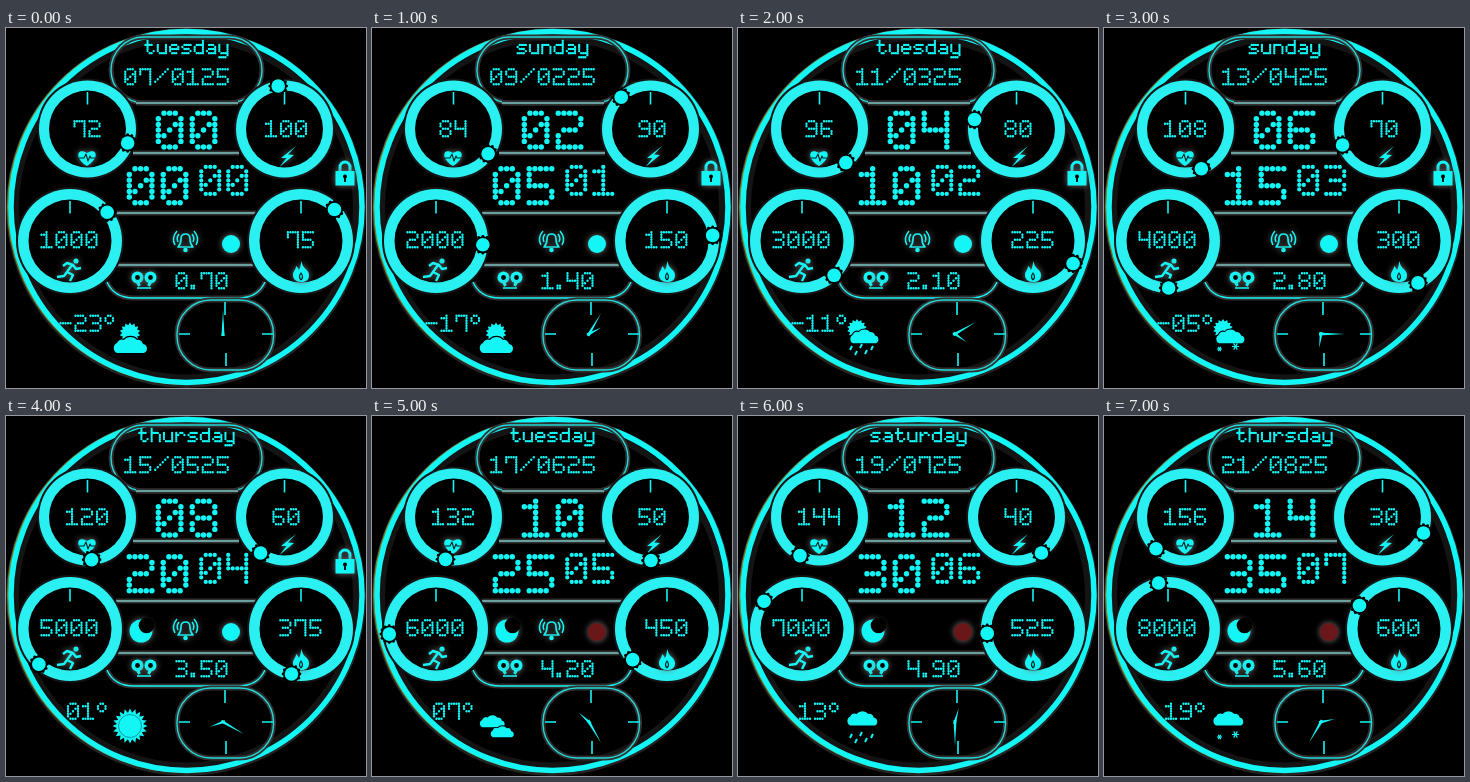
An HTML page with a canvas for the animation above (8000 ms loop, 360 by 360 pixels).

```html
<!DOCTYPE html>
<html lang="en">
<head>
<meta charset="utf-8">
<title>Watch face</title>
<style>
  html, body { margin: 0; width: 100%; height: 100%; overflow: hidden; background: #000; }
  canvas { display: block; }
</style>
</head>
<body>
<canvas id="face" width="360" height="360"></canvas>
<script>
const c = document.getElementById('face').getContext('2d');
const CYAN = '#14f5f5', RING = '#2af0f2', HALO = '#303030', TAU = Math.PI * 2;

// Each glyph is a set of strokes through column/row points of a dot grid.
const GLYPHS = {
  0: '10 30 41 45 36 16 05 01 10|32 14', 1: '01 11 20 26|06 46',
  2: '00 30 41 42 33 13 04 06 46', 3: '00 30 41 42 33 13|33 44 45 36 06',
  4: '00 03 43|40 46', 5: '40 00 03 33 44 45 36 06',
  6: '40 10 01 05 16 36 45 44 33 03', 7: '02 00 40 46',
  8: '10 30 41 42 33 13 02 01 10|33 44 45 36 16 05 04 13',
  9: '43 13 02 01 10 30 41 45 36 06',
  '-': '03 43', '/': '50 05', '.': '05 15 16 06', '°': '10 20 31 32 23 13 02 01 10',
  t: '10 15 26 36 45|02 32', u: '02 05 16 36|42 46', e: '04 44 43 32 12 03 05 16 36',
  s: '42 12 03 14 34 45 36 06', d: '40 46 16 05 03 12 42', a: '12 32 43 46 16 05 14 44',
  y: '02 05 16 46|42 47 38 08', h: '00 06|02 32 43 46', r: '02 06|04 22 32 43',
  n: '02 06|02 32 43 46'
};
const DAYS = ['tuesday', 'sunday', 'tuesday', 'sunday', 'thursday', 'tuesday', 'saturday', 'thursday'];
const ADVANCE = { '.': 4, '/': 7 };
const pad = n => String(n).padStart(2, '0');
const advance = ch => ADVANCE[ch] || 6;

function glyphDots(glyph) {
  const dots = new Set();
  for (const stroke of glyph.split('|')) {
    const points = stroke.split(' ').map(p => [+p[0], +p[1]]);
    for (let i = 1; i < points.length; i++) {
      const [x, y] = points[i - 1], dx = points[i][0] - x, dy = points[i][1] - y;
      const n = Math.max(Math.abs(dx), Math.abs(dy));
      for (let k = 0; k <= n; k++) dots.add(Math.round(x + dx * k / n) + ',' + Math.round(y + dy * k / n));
    }
  }
  return [...dots].map(d => d.split(',').map(Number));
}
const DOTS = Object.fromEntries(Object.entries(GLYPHS).map(([ch, g]) => [ch, glyphDots(g)]));

function disc(x, y, r, color = CYAN) {
  c.fillStyle = color;
  c.beginPath();
  c.arc(x, y, r, 0, TAU);
  c.fill();
}

function circle(x, y, r, width, color) {
  c.strokeStyle = color;
  c.lineWidth = width;
  c.beginPath();
  c.arc(x, y, r, 0, TAU);
  c.stroke();
}

function text(str, x, y, pitch) {
  const r = Math.max(1.18, pitch * .48);
  c.fillStyle = CYAN;
  c.beginPath();
  for (const ch of str) {
    for (const [col, row] of DOTS[ch]) {
      const px = x + (col + .5) * pitch, py = y + (row + .5) * pitch;
      c.moveTo(px + r, py);
      c.arc(px, py, r, 0, TAU);
    }
    x += advance(ch) * pitch;
  }
  c.fill();
}

function centered(str, cx, y, pitch = 2.5) {
  const columns = [...str].reduce((sum, ch) => sum + advance(ch), -1);
  text(str, cx - columns * pitch / 2, y, pitch);
}

function fill(d, color = CYAN) {
  c.fillStyle = color;
  c.fill(new Path2D(d));
}

function line(d, width, color = CYAN) {
  c.strokeStyle = color;
  c.lineWidth = width;
  c.stroke(new Path2D(d));
}

function glow(draw) {
  c.save();
  c.shadowColor = '#777';
  c.shadowBlur = 6;
  draw();
  c.restore();
}

function haloLine(d, color) {
  line(d, 5, HALO);
  line(d, 1.4, color);
}

function pill(x, y, w, h, r) {
  const side = w - 2 * r, rise = h - 2 * r, arc = `a${r} ${r} 0 0 1 `;
  haloLine(`M${x + r} ${y}h${side}${arc}${r} ${r}v${rise}${arc}${-r} ${r}h${-side}${arc}${-r} ${-r}v${-rise}${arc}${r} ${-r}Z`, '#22d8d8');
}

function ring(x, y, r, width) {
  disc(x, y, r + 2, '#151515');
  disc(x, y, r, RING);
  disc(x, y, r - width, '#000');
  line(`M${x} ${y - r + width + 1.5}v12.5`, 1.6);
}

function knob(x, y, r, degrees) {
  const a = degrees * Math.PI / 180, kx = x + r * Math.sin(a), ky = y - r * Math.cos(a);
  disc(kx, ky, 8.6, '#000');
  for (let i = 0; i < 12; i++) disc(kx + 8.4 * Math.cos(i * TAU / 12), ky + 8.4 * Math.sin(i * TAU / 12), 1.4, '#000');
  disc(kx, ky, 6.8);
}

function hand(degrees, length) {
  c.save();
  c.translate(217, 306);
  c.rotate(degrees * Math.PI / 180);
  fill(`M-1.5 2L0 ${-length}L1.5 2Z`);
  c.restore();
}

function sun(x, y, r, rays) {
  c.fillStyle = CYAN;
  c.beginPath();
  for (let i = 0; i < rays * 2; i++) {
    const a = i * Math.PI / rays, d = i % 2 ? r * .76 : r;
    c.lineTo(x + d * Math.sin(a), y - d * Math.cos(a));
  }
  c.fill();
}

function cloud(x, y, s = 1) {
  c.save();
  c.translate(x, y);
  c.scale(s, s);
  const d = 'M-13 9A5.5 5.5 0 0 1-13-1A5 5 0 0 1-6-4A8 7 0 0 1 7-4A5 5 0 0 1 13 0A4.7 4.7 0 0 1 14 9Z';
  line(d, 2.5, '#000');
  fill(d);
  c.restore();
}

function rain() {
  for (const [x, y] of [[114, 318], [124, 316], [135, 318], [119, 323], [129, 322]])
    line(`M${x} ${y}l-2 4`, 2);
}

function flake(x, y, r) {
  for (let i = 0; i < 3; i++) {
    const dx = r * Math.cos(i * Math.PI / 3), dy = r * Math.sin(i * Math.PI / 3);
    line(`M${x - dx} ${y - dy}L${x + dx} ${y + dy}`, 1.2);
  }
}

function snow() {
  flake(115.5, 321, 2.4);
  flake(131.5, 318.5, 3.6);
}

function sunCloud() {
  sun(124, 305, 10.5, 14);
  cloud(124, 316);
}

function shower() {
  sun(119, 301, 10, 14);
  cloud(126, 307.5, .85);
}

function greyCloud() {
  cloud(124, 301.5, .9);
}

const WEATHER = [
  sunCloud,
  sunCloud,
  () => { shower(); rain(); },
  () => { shower(); snow(); },
  () => { sun(124, 310, 17.5, 20); circle(124, 310, 11.5, .7, '#077'); },
  () => { cloud(120, 304.5, .75); cloud(130, 315, .7); },
  () => { greyCloud(); rain(); },
  () => { greyCloud(); snow(); }
];

function background() {
  c.fillStyle = '#000';
  c.fillRect(0, 0, 360, 360);
  circle(180, 180, 178, 4, '#242424');
  circle(180, 179.5, 170, 6, '#141414');
  circle(179, 179, 177, 2, '#77802a');
  circle(180.5, 179, 175.5, 5.5, CYAN);
  pill(105, 9, 151, 66, 33);
  for (const [x, y, w] of [[130, 75, 102], [127, 125, 106], [110, 185, 140], [110, 237, 140]])
    haloLine(`M${x} ${y}h${w}`, '#7cc4c4');
  haloLine('M101 254Q108 270 128 270H232Q252 270 259 254', CYAN);
  ring(81.5, 101, 48.5, 10);
  ring(278.5, 101, 48.5, 10);
  ring(64, 213, 52, 10.5);
  ring(295, 213, 52, 10.5);
  pill(171, 272, 96.5, 70, 34);
  line('M219 274v13M220 325v13M173 306h11M256 306h11', 1.6);
}

function icons(step) {
  glow(() => {
    fill('M81 138C67 129 72 119 81 125C90 119 95 129 81 138Z');
    fill('M290 118L275 130L280.5 130L273.5 139L288 127L282 126.5Z');
    fill('M296 233C295 240 303 241 303 247C303 253 299 254 295 254C290 254 287 251 287 247C287 243 290 242 290 238C292 239 292 241 293 242C295 239 294 236 296 233Z');
    disc(70, 233, 2.6);
    line('M66 237L61 244L67 247L64 253M61 244L58 248L51 249M57 238L61 235L67 237L70 241L75 240', 2.4);
    for (const x of [131.5, 144.5]) {
      disc(x, 249.5, 6);
      line(`M${x} 254l${x < 138 ? 2 : -2} 4`, 3);
    }
    line('M131 260h14', 1.5);
    if (step < 6) {
      line('M172 219Q175 216 175 211Q175 206 179.5 206Q184 206 184 211Q184 216 187 219Z', 1.7);
      disc(179.5, 222, 2.3);
      line('M173 206Q170 210 172 214M171 203Q165 210 169 217M186 206Q189 210 187 214M188 203Q194 210 190 217', 1.5);
    }
    if (step > 3) disc(135, 215, 11.5);
    if (step < 5) {
      line('M334 144V139A5 5 0 0 1 344 139V144', 3);
      fill('M329.5 143H348.5V157.5H329.5Z');
    }
    disc(225, 216, 9, step < 5 ? CYAN : '#6a1719');
  });
  WEATHER[step]();
  if (step > 3) disc(140.5, 209.5, 7.8, '#000');
  line('M73 130h5l2-4l2 7l2-5l1 2h4', 1.1, '#022');
  line('M295 252Q292 249 295 245Q298 249 295 252', 1.2, '#022');
  disc(131.5, 249.5, 2.4, '#000');
  disc(144.5, 249.5, 2.4, '#000');
  if (step < 5) {
    disc(339, 148.5, 2, '#000');
    line('M339 148v6', 1.8, '#000');
  }
}

function draw(now) {
  const step = Math.floor(now / 1000) % 8, hour = step * 2, minute = step * 5;
  const degrees = 6 * step - 23;
  c.lineJoin = 'round';
  background();
  icons(step);

  centered(DAYS[step], 180.5, 11.8, 2.05);
  text(`${pad(7 + 2 * step)}/${pad(step + 1)}25`, 118, 40, 2.5);
  text(pad(hour), 149.5, 82.3, 5.65);
  text(pad(minute), 120.5, 138, 5.65);
  text(pad(step), 193, 136.7, 4.5);
  centered(String(72 + 12 * step), 81, 92);
  centered(String(100 - 10 * step), 280, 92);
  centered(String(1000 * (step + 1)), 63, 203);
  centered(String(75 * (step + 1)), 294.4, 203);
  centered((.7 * (step + 1)).toFixed(2), 195.5, 244);
  centered((degrees < 0 ? '-' : '') + pad(Math.abs(degrees)) + '°', 82, 286.5);

  knob(81, 101, 43, 109 + 16.2 * step);
  knob(279, 101, 43.5, -9 - 34.2 * step);
  knob(64, 213, 47, 52.3 + 42.3 * step);
  knob(295, 213, 46, 46.7 + 36.3 * step);
  hand(hour * 30 + minute / 2, 14);
  hand(minute * 6, 24);
}

function tick() {
  draw(performance.now());
  requestAnimationFrame(tick);
}
tick();
</script>
</body>
</html>
```
